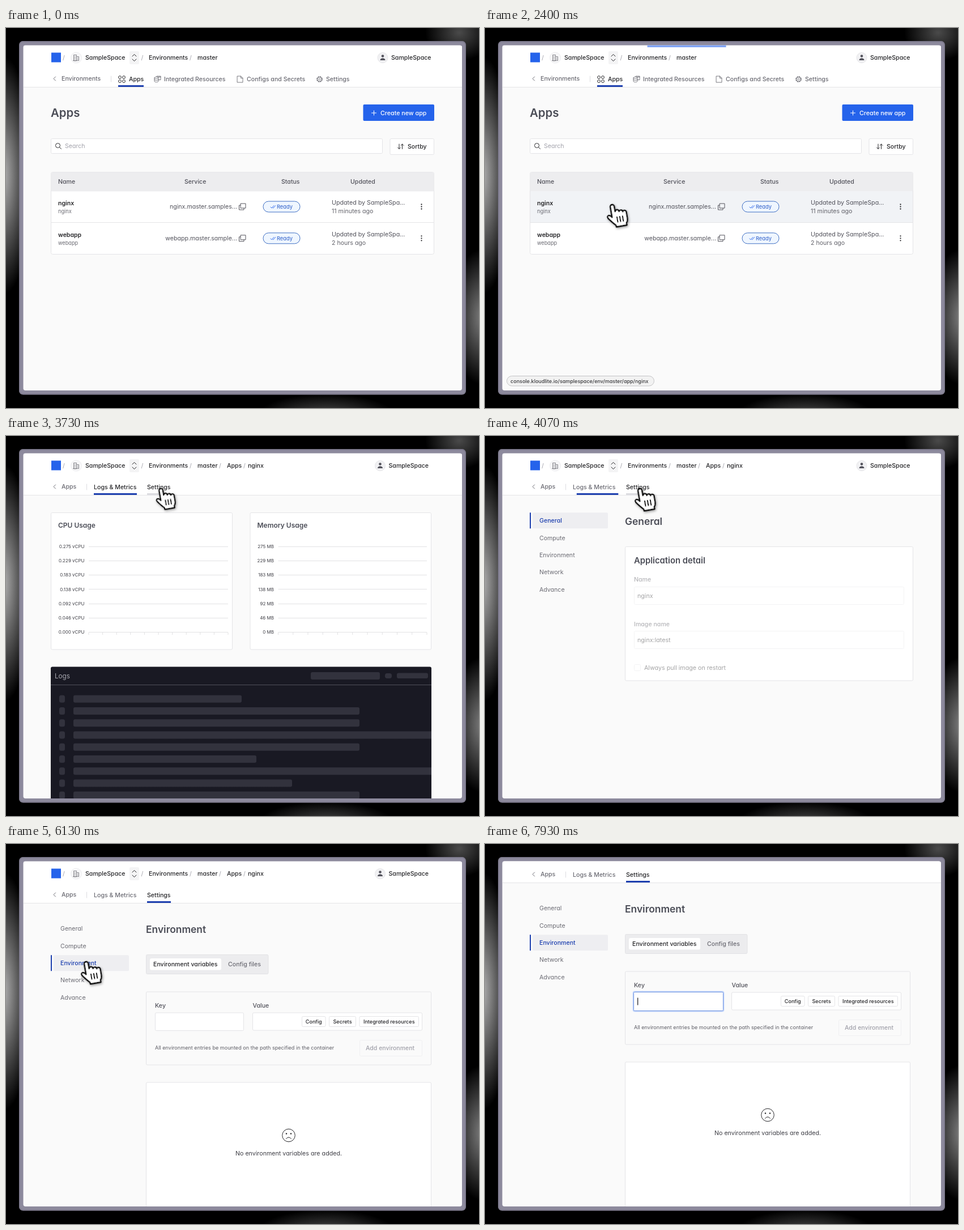
An HTML page for the animation above (8 s loop, 835 px wide and 671 px high).

```html
<!DOCTYPE html>
<html lang="en">
<head>
<meta charset="utf-8">
<title>App console walkthrough</title>
<style>
  html, body { margin: 0; width: 100%; height: 100%; overflow: hidden; background: #000; }
  svg { display: block; width: 835px; height: 671px; }
  text { font-family: Inter, "Open Sans", sans-serif; font-feature-settings: "cv11"; white-space: pre; }
</style>
</head>
<body>
<svg id="stage" viewBox="0 0 835 671" xmlns="http://www.w3.org/2000/svg"></svg>
<script>
const LOOP = 8000;
const INK = '#27272a', GREY = '#6b6b73', TITLE = '#4b4d57', LINE = '#e4e4e7',
      BLUE = '#2563eb', NAVY = '#1e40af', WHITE = '#fff';
const USER = 'SampleSpace';

// Markup helpers; text is placed by its vertical centre
const text = (x, y, s, fill = INK, size = 10.6, weight = 500, extra = '') =>
  `<text x="${x}" y="${(y + size * .36).toFixed(2)}" fill="${fill}" font-size="${size}" font-weight="${weight}" ${extra}>${s}</text>`;
const rect = (x, y, w, h, fill, r = 0, extra = '') =>
  `<rect x="${x}" y="${y}" width="${w}" height="${h}" rx="${r}" fill="${fill}" ${extra}/>`;
const box = (x, y, w, h, r = 2, fill = WHITE, stroke = LINE) =>
  rect(x + .5, y + .5, w - 1, h - 1, fill, r, `stroke="${stroke}"`);
const path = (d, stroke = GREY, width = 1, fill = 'none') =>
  `<path d="${d}" stroke="${stroke}" stroke-width="${width}" fill="${fill}" stroke-linecap="round" stroke-linejoin="round"/>`;
const circle = (x, y, r, fill, extra = '') => `<circle cx="${x}" cy="${y}" r="${r}" fill="${fill}" ${extra}/>`;
const group = (id, body, extra = '') => `<g id="${id}" ${extra}>${body}</g>`;
const END = 'text-anchor="end"', MID = 'text-anchor="middle"';
const range = (n, f) => Array.from({ length: n }, (_, i) => f(i)).join('');
const slash = x => text(x, 52, '/', '#a1a1aa', 10.6, 400, MID);
const back = s => path('M87.5 86l-3.5 3.5 3.5 3.5') + text(98, 89.5, s, GREY);
const divider = x => path(`M${x}.5 85v10`, '#dcdce0');

function topBar() {
  return rect(31, 31, 774, 73, WHITE) + rect(31, 104, 774, 1, LINE) +
    rect(80, 43.5, 17, 17, BLUE) + slash(102) +
    circle(124, 52.5, 9.5, '#f8f8f9', 'stroke="#ececef"') +
    path('M119.5 57.5v-10h5v10zM124.5 50.5h4v7h-10M121 50h1.5M121 52.5h1.5M121 55h1.5M126 53h1M126 55.5h1', GREY, .8) +
    text(140, 52, USER) + rect(218, 41, 17, 23, '#f4f4f5', 2) +
    path('M223 50l3.5-3.5 3.5 3.5M223 55l3.5 3.5 3.5-3.5', INK) +
    slash(240.5) + text(252, 52, 'Environments') + slash(326) + text(338, 52, 'master') +
    group('crumbs', slash(378) + text(390, 52, 'Apps') + slash(421) + text(427, 52, 'nginx')) +
    group('user', circle(665, 52.5, 9, '#f1f1f3', 'stroke="#e6e6e9"') + circle(665, 49.5, 2.3, '#52525b') +
      path('M660.5 57c0-5 9-5 9 0z', 'none', 0, '#52525b') + text(680, 52, USER));
}

function envTabs() {
  const dots = [[201, 87], [208, 87], [201, 94], [208, 94]]
    .map(([x, y]) => circle(x, y, 2.4, 'none', `stroke="${INK}"`)).join('');
  const gear = circle(553.5, 90.5, 4.4, 'none', `stroke="${GREY}" stroke-width="1.8" stroke-dasharray="2.3 1.15"`) +
    circle(553.5, 90.5, 3.8, WHITE, `stroke="${GREY}" stroke-width=".8"`) + circle(553.5, 90.5, 1.6, 'none', `stroke="${GREY}" stroke-width=".8"`);
  return back('Environments') + divider(185) + dots + text(217, 90.5, 'Apps') + rect(198, 101, 45, 3, NAVY) +
    path('M262 88v6c0 2 7 2 7 0v-6c0-2-7-2-7 0c0 2 7 2 7 0M262 91c0 2 7 2 7 0M266 86v-1h7v6.5h-4M268 86.5h5', GREY, .9) +
    text(279, 90.5, 'Integrated Resources', GREY) +
    path('M408.5 85h6l3.5 3.5V96h-9.500zM414.500 85v3.500H418', GREY, .9) +
    text(425, 90.5, 'Configs and Secrets', GREY) + gear + text(565, 90.5, 'Settings', GREY);
}

const appTabs = () => back('Apps') + divider(142) +
  text(155, 90.5, 'Logs &amp; Metrics', GREY, 10.6, 500, 'id="logsTab"') +
  text(249, 90.5, 'Settings', GREY, 10.6, 500, 'id="setTab"') +
  rect(249, 101, 42, 3, '#dddde1', 0, 'id="tabHint"') + rect(155, 101, 76, 3, NAVY, 0, 'id="tabLine"');

function row(y, name, service, when) {
  return text(92, y - 6.5, name, INK, 10.5, 600) + text(92, y + 8.5, name, GREY, 9.2, 400) +
    text(408, y, service, '#52525b', 10.6, 400, END) +
    path(`M414.500 ${y - 5.5}h8.500v8h-8.500zM414 ${y - 2.500}h-2.500v8h8.500v-2.500`, '#52525b') +
    box(453.5, y - 10, 66, 20, 9.5, '#eff6ff', '#3f6fc4') +
    path(`M467 ${y + .5}l2 2 4-4.500M471 ${y + 2}l.8.5 4-4.500`, BLUE, .9) + text(478, y, 'Ready', '#2a5cc8', 9.3, 400) +
    text(575, y - 7, 'Updated by SampleSpa...', '#52525b', 10.7, 400) + text(575, y + 8, when, '#62626a', 10.6, 400) +
    [-4, 0, 4].map(d => circle(733.5, y + d, 1.15, INK)).join('');
}

function appsPage() {
  return text(79, 150, 'Apps', TITLE, 20.4, 600) + rect(630.5, 135, 125.5, 29, BLUE, 2) +
    path('M645.500 150h8M649.500 146v8', WHITE) + text(661, 150, 'Create new app', WHITE, 10.7) +
    box(79, 195, 586, 27) + circle(91.5, 207.5, 4, 'none', `stroke="${INK}"`) + path('M94.500 210.500l3 3', INK) +
    text(104, 208, 'Search', '#a1a1aa', 10.6, 400) + box(677.5, 195, 78.5, 29) +
    path('M694 205v8.500M691.500 211l2.500 2.500 2.500-2.500M699.500 213.500V205M697 207.500l2.500-2.500 2.500 2.500', INK) +
    text(709, 209.5, 'Sortby') +
    box(79, 254, 677, 146, 3) + rect(79.5, 254.5, 676, 34, '#ededef', 2) +
    rect(80, 288, 675, 56, '#f1f3f6', 0, 'id="rowHover"') + rect(80, 343, 675, 1, LINE) +
    [[92, 'Name'], [315, 'Service'], [486, 'Status'], [608, 'Updated']].map(([x, s]) => text(x, 271.5, s, '#52525b')).join('') +
    row(315.5, 'nginx', 'nginx.master.samples...', '11 minutes ago') +
    row(371.3, 'webapp', 'webapp.master.sample...', '2 hours ago');
}

function chart(x, w, title, left, right, labels, unit) {
  const step = (right - left) / 10;
  return box(x, 135, w, 242.500) + text(x + 13, 157.500, title, TITLE, 12, 600) +
    labels.map((s, i) => {
      const y = 346.5 - i * 25.25;
      return text(left - 7.500, y, s + unit, '#3f3f46', 8, 400, END) + rect(left, Math.round(y - .5), right - left, 1, '#e2e2e4');
    }).join('') + range(11, i => rect(left + i * step - .5, 347, 1, 4, '#e0e0e2'));
}

function metricsPage() {
  const bar = (x, y, w, h, r) => rect(x, y, w, h, 'url(#shimmer)', r);
  const ends = [416, 624, 624, 770, 624, 442, 770, 505, 624];
  return chart(79, 321, 'CPU Usage', 146, 392, ['0.000', '0.046', '0.092', '0.138', '0.183', '0.229', '0.275'], ' vCPU') +
    chart(430.5, 320.5, 'Memory Usage', 480.5, 743, [0, 46, 92, 138, 183, 229, 275], ' MB') +
    rect(79, 407.5, 672, 240, '#191923', 3) + text(86, 423.5, 'Logs', '#a6a6ae', 11.7, 400) +
    rect(79, 439, 672, 1, '#50505a') +
    bar(538, 417, 122, 13, 3) + bar(669, 419, 12, 9, 4) + bar(690, 418.5, 55, 9.500, 3) +
    `<g clip-path="url(#logClip)">${ends.map((e, i) => {
      const y = 457.8 + i * 21.25;
      return bar(94, y, 10, 13, 3.5) + bar(119, y, e - 119, 13, 3);
    }).join('')}</g>`;
}

const sideNames = ['General', 'Compute', 'Environment', 'Network', 'Advance'];
const sideBar = active => sideNames.map((s, i) => {
  const y = 149.3 + i * 30.45, on = s === active;
  return (on ? rect(84, y - 14, 133, 28, '#eeeef1', 2) + rect(79, y - 14, 2, 28, NAVY) : '') +
    text(96, y, s, on ? NAVY : GREY, 10.6, on ? 500 : 400, `class="side-${s}"`);
}).join('');

const generalPage = () => rect(82, 166, 139, 28, '#f4f5f8', 2, 'id="sideHover"') + sideBar('General') +
  text(247, 150.5, 'General', TITLE, 17.4, 600) + box(247, 195, 509, 237.500) +
  text(263, 220, 'Application detail', TITLE, 14.8, 600) +
  group('fields', text(263, 253.5, 'Name', '#52525b') + box(263, 266, 477, 32) + text(269, 282, 'nginx', INK, 10.7, 400) +
    text(263, 332, 'Image name', '#52525b') + box(263, 344, 477, 32) + text(269, 360.5, 'nginx:latest', INK, 10.7, 400) +
    box(263, 403, 12, 12) + text(281, 408.8, 'Always pull image on restart', INK, 10.7, 400));

const chip = (x, w, s) => box(x, 304, w, 19, 2) + text(x + w / 2, 313.8, s, INK, 9.1, 500, MID);

const envPage = () => sideBar('Environment') + text(247, 150.5, 'Environment', TITLE, 17.4, 600) +
  box(247, 195, 216.500, 35, 2, '#ececee', '#e2e2e5') + rect(254, 202, 126, 20.500, WHITE, 3) +
  text(260, 212.5, 'Environment variables', INK, 10.6) + text(392, 212.5, 'Config files', GREY, 10.6) +
  box(247, 260.5, 504, 130, 2, '#fafafa') + text(263, 285.5, 'Key', '#52525b') + box(263, 297.5, 157, 32.500) +
  group('focus', rect(261.5, 296.5, 160, 35, WHITE, 3, 'stroke="#c3d6fb" stroke-width="2"') +
    rect(262.5, 297.5, 158, 33, WHITE, 2, 'stroke="#6f93df"') + rect(269, 307.5, 1.3, 13, INK, 0, 'id="caret"')) +
  text(435.5, 285.5, 'Value', '#52525b') + box(435, 297.5, 300, 32) +
  chip(522, 42.500, 'Config') + chip(570, 48, 'Secrets') + chip(623.5, 105.500, 'Integrated resources') +
  text(263, 360, 'All environment entries be mounted on the path specified in the container', '#5f5f67', 9.1, 400) +
  box(624, 346, 111, 29, 2, '#fafafa', '#f0f0f2') + text(635, 360, 'Add environment', '#a1a1aa', 10.5) +
  box(247, 420.5, 504, 300) + circle(499, 514.5, 11.3, 'none', `stroke="${INK}"`) +
  circle(495, 511.5, 1.2, INK) + circle(503, 511.5, 1.2, INK) + path('M494.500 520.500q4.500-5.500 9 0', INK) +
  text(499, 546.5, 'No environment variables are added.', '#3f3f46', 10.7, 400, MID);

function pointers() {
  const ibeam = 'M-9-20Q-1-20 0-15Q1-20 9-20M0-15V16M-9 21Q-1 21 0 16Q1 21 9 21M-4 2H4';
  return group('cursor',
    group('arrow', path('M0 0V36L8.500 28.500 14 41 20 38.500 14.500 26.500H26Z', WHITE, 4, '#000') +
      path('M0 0V36L8.500 28.500 14 41 20 38.500 14.500 26.500H26Z', 'none', 0, '#000'), 'filter="url(#shadow)"') +
    group('hand', path('M-3.500 3.500a3.500 3.500 0 0 1 7 0V13a3.400 3.200 0 0 1 6.800 1a3.400 3.200 0 0 1 6.500 1.500a3.200 3.200 0 0 1 6 2V27q0 6-3 9V40H1V37Q-4 32-10.500 23q-2-4 1-5q3-.5 6 4Z', '#000', 2.3, WHITE) +
      path('M5 23v9M10 23v9M15 23v9', '#000', 2), 'filter="url(#shadow)"') +
    group('ibeam', path(ibeam, WHITE, 11) + path(ibeam, '#4a4a4a', 4.5), 'filter="url(#soft)"'));
}

const glow = (id, c) => `<radialGradient id="${id}"><stop offset="0" stop-color="${c}"/>
  <stop offset=".45" stop-color="${c}" stop-opacity=".55"/><stop offset="1" stop-color="${c}" stop-opacity="0"/></radialGradient>`;
const blob = (id, x, y, rx, ry) => `<ellipse cx="${x}" cy="${y}" rx="${rx}" ry="${ry}" fill="url(#${id})"/>`;

document.getElementById('stage').innerHTML = `<defs>
  ${glow('g1', '#b0b0b0')}${glow('g2', '#808080')}${glow('g3', '#4a4a4a')}
  <linearGradient id="shimmer"><stop offset="0" stop-color="#32323d"/><stop offset=".5" stop-color="#474752"/><stop offset="1" stop-color="#32323d"/></linearGradient>
  <clipPath id="view">${rect(30.5, 30.5, 774.5, 609.500, WHITE, 4)}</clipPath>
  <clipPath id="logClip">${rect(79, 440, 672, 200, WHITE)}</clipPath>
  <filter id="shadow" x="-50%" y="-50%" width="200%" height="200%"><feDropShadow dx="1" dy="2" stdDeviation="2" flood-opacity=".4"/></filter>
  <filter id="soft" x="-50%" y="-50%" width="200%" height="200%"><feGaussianBlur stdDeviation="1.3"/></filter>
</defs>` + rect(0, 0, 835, 671, '#000') +
  blob('g1', -4, 260, 52, 210) + blob('g2', 842, 510, 60, 120) + blob('g3', 565, 684, 120, 38) + blob('g3', 800, 8, 60, 50) +
  rect(23, 23, 789, 624.500, '#8d8a9d', 7) + rect(24, 24, 787, 622.500, 'none', 6, 'stroke="#7b788b" stroke-width="1.5"') +
  `<g clip-path="url(#view)">` + rect(30, 30, 776, 611, '#fafafa') +
  group('scroll', topBar() + group('envTabs', envTabs()) + group('appTabs', appTabs()) + group('apps', appsPage()) +
    group('metrics', metricsPage()) + group('general', generalPage()) + group('env', envPage())) +
  rect(0, 30, 139, 4, '#7fa3f4', 0, 'id="loader"') +
  group('status', box(38, 614, 261, 18.500, 9, '#f2f2f2', '#c4c4c6') +
    text(45, 623.3, 'console.kloudlite.io/samplespace/env/master/app/nginx', '#3a3a3d', 9)) +
  pointers() + '</g>';

const el = {};
document.querySelectorAll('[id]').forEach(n => el[n.id] = n);
const sideCompute = el.general.querySelector('.side-Compute');

const clamp = v => Math.max(0, Math.min(1, v));
const ramp = (t, a, b) => clamp((t - a) / (b - a));
const ease = v => v * v * (3 - 2 * v);
const mix = (a, b, k) => a + (b - a) * k;
const show = (name, on) => el[name].setAttribute('display', on ? 'inline' : 'none');
const set = (name, attrs) => { for (const k in attrs) el[name].setAttribute(k, attrs[k]); };

const METRICS = 2730, SETTINGS = 4000, ENV = 6050, FOCUS = 7050;
const loads = [[2150, METRICS], [5620, ENV]];
const clicks = [2120, 3780, 5600, FOCUS];
const route = [[930, 520, 470], [1750, 224, 312], [2600, 224, 312], [3000, 292, 308], [3200, 292, 308],
  [3720, 273, 93], [4350, 273, 93], [5180, 141, 189], [5240, 141, 192], [5480, 141, 208], [6200, 141, 208], [6830, 276, 303]];
const shapes = [[0, 'arrow'], [1540, 'hand'], [2800, 'arrow'], [3620, 'hand'], [4480, 'arrow'], [5270, 'hand'], [6180, 'arrow'], [6700, 'ibeam']];

function pointAt(t) {
  let i = 0;
  while (i < route.length - 2 && t > route[i + 1][0]) i++;
  const [a, x, y] = route[i], [b, u, v] = route[i + 1], k = ease(ramp(t, a, b));
  return [mix(x, u, k), mix(y, v, k)];
}

function draw(t) {
  const onApps = t < METRICS, onMetrics = !onApps && t < SETTINGS, onEnv = t >= ENV;
  show('apps', onApps); show('envTabs', onApps);
  show('appTabs', !onApps); show('crumbs', !onApps);
  show('metrics', onMetrics); show('general', t >= SETTINGS && !onEnv); show('env', onEnv);
  set('user', { transform: `translate(${onMetrics || onEnv ? -4.5 : 0} 0)` });
  set('scroll', { transform: `translate(0 ${-36 * ease(ramp(t, 7200, 7650))})` });

  show('rowHover', t >= 1540);
  show('status', t >= 1600 && t < 3400);
  set('status', { opacity: Math.min(ramp(t, 1600, 1750), 1 - ramp(t, 3150, 3400)) });

  const load = loads.find(([a, b]) => t >= a && t < b);
  show('loader', load);
  if (load) set('loader', { x: -108 + (t - load[0]) * 1.572 });

  const k = ease(ramp(t, 4020, 4330)), left = mix(155, 249, k), right = mix(231, 291, k);
  set('tabLine', { x: left, width: right - left });
  set('logsTab', { fill: onMetrics ? INK : GREY });
  set('setTab', { fill: t > 3620 ? INK : GREY });
  show('tabHint', t > 3620 && t < 4400);

  const sweep = ((t - 2440) % 1500) / 1500 * 2 - 1;
  el.shimmer.setAttribute('x1', sweep + .58);
  el.shimmer.setAttribute('x2', sweep + 1.58);

  set('fields', { opacity: mix(.42, 1, ramp(t, 4100, 4350)) });
  const over = t > 5060 && t < 5290;
  show('sideHover', over);
  sideCompute.setAttribute('fill', over ? INK : GREY);

  show('focus', t >= FOCUS);
  show('caret', (t - FOCUS) % 1060 < 530 || t > 7800);

  const [x, y] = pointAt(t);
  const press = Math.max(...clicks.map(c => 1 - clamp(Math.abs(t - c) / 110)));
  const shape = shapes.filter(s => s[0] <= t).pop()[1];
  ['arrow', 'hand', 'ibeam'].forEach(s => show(s, s === shape));
  set('hand', { transform: 'rotate(-10)' });
  show('cursor', t >= 930 && t < 7300);
  set('cursor', {
    transform: `translate(${x} ${y}) scale(${1 - .12 * press})`,
    opacity: Math.min(ramp(t, 930, 1060), 1 - ramp(t, 7140, 7300))
  });
}

const start = performance.now();
function tick() {
  draw((performance.now() - start) % LOOP);
  requestAnimationFrame(tick);
}
tick();
</script>
</body>
</html>
```
